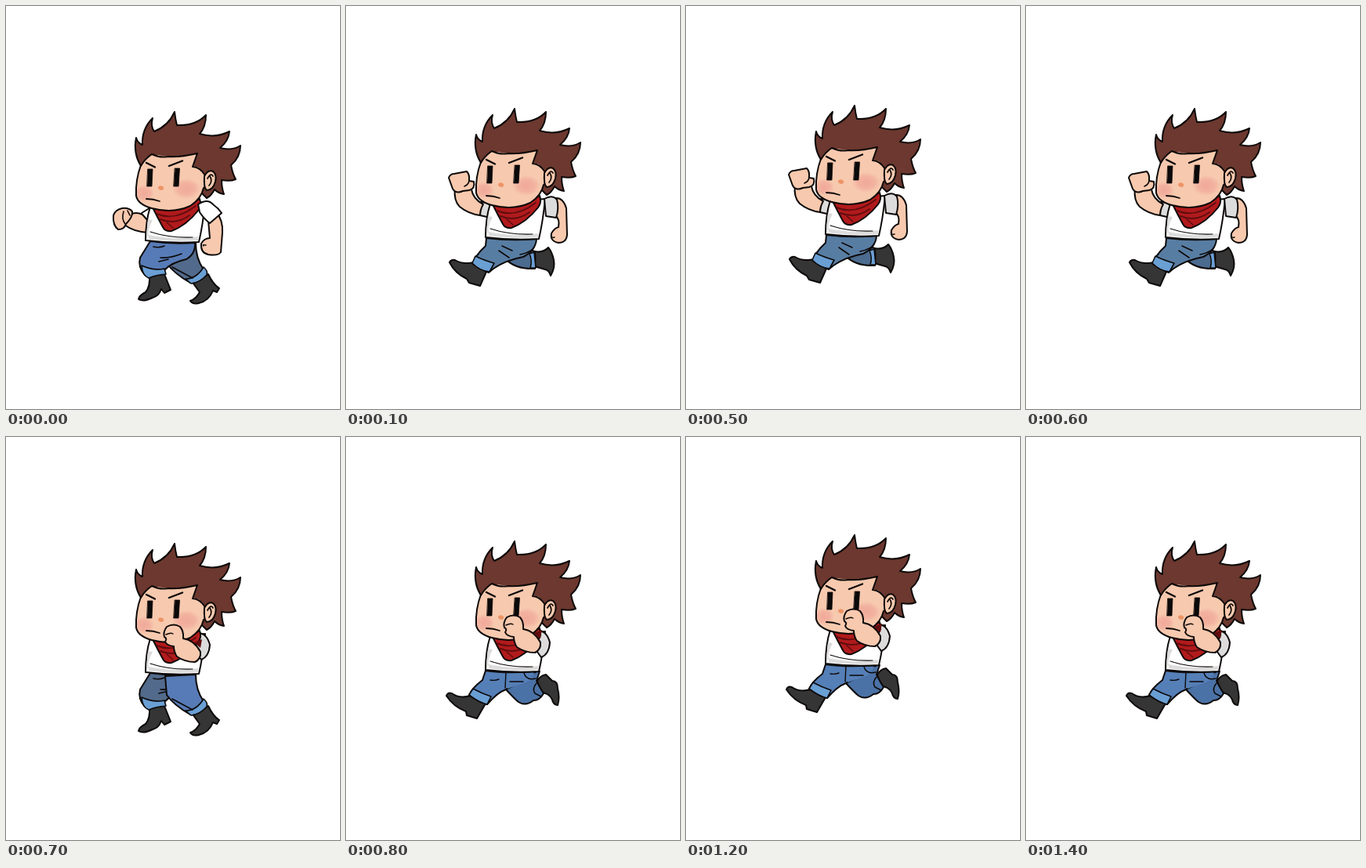
Write an HTML page with a canvas that moves like this. It is 426 by 514 pixels and loops after 1.5 s.

```html
<!DOCTYPE html>
<html lang="en">
<head>
<meta charset="utf-8">
<title>Runner</title>
<style>
html, body { margin: 0; height: 100%; overflow: hidden; background: #fff; }
canvas { display: block; width: 426px; height: 514px; }
</style>
</head>
<body>
<canvas></canvas>
<script>
const canvas = document.querySelector('canvas');
const ctx = canvas.getContext('2d');
const ratio = devicePixelRatio || 1;
canvas.width = 426 * ratio;
canvas.height = 514 * ratio;

const INK = '#0d0908', SKIN = '#f7c9ae', HAIR = '#6c382f', RED = '#b11a1c', DARK_RED = '#5f0d0f';
const SHADE = '#dcdcdc', BOOT = '#343534', CUFF = '#6a9fd4';

function shape(fill, d, width = 2) {
  const path = new Path2D(d);
  ctx.fillStyle = fill;
  ctx.fill(path);
  if (width) stroke(path, width);
}
function line(d, width = 1.6, color) { stroke(new Path2D(d), width, color); }
function stroke(path, width, color = INK) {
  ctx.lineWidth = width;
  ctx.strokeStyle = color;
  ctx.stroke(path);
}
function shifted(y, draw) {
  ctx.save();
  ctx.translate(0, y);
  draw();
  ctx.restore();
}
function blush(x, y, rx, ry) {
  ctx.save();
  ctx.translate(x, y);
  ctx.scale(rx, ry);
  const glow = ctx.createRadialGradient(0, 0, 0, 0, 0, 1);
  glow.addColorStop(0, '#ec908a90');
  glow.addColorStop(.6, '#ec908a66');
  glow.addColorStop(1, '#ec908a00');
  ctx.fillStyle = glow;
  ctx.fillRect(-1, -1, 2, 2);
  ctx.restore();
}

function head() {
  shape(HAIR, 'M172 194Q162 178 166 158Q168 165 174 167Q173 147 187 133Q184 143 189 150Q207 143 215 125Q216 134 218 142Q242 143 255 129Q255 144 247 153Q267 159 285 150Q284 162 273 171Q288 175 299 168Q299 183 287 193Q289 204 293 211Q286 214 275 212Q275 222 278 230Q271 229 266 224Q262 232 256 235L246 225L200 200Z');
  shape(SKIN, 'M172 193Q165 212 166 232Q168 243 186 248Q213 255 235 245Q249 236 252 222L255 206L246 196L239 194L243 178Q223 184 207 182Q196 180 186 180Q180 184 172 193Z', 0);
  blush(176, 229, 13, 11);
  blush(230, 223, 18, 13);
  line('M172 193Q165 212 166 232Q168 243 186 248Q213 255 235 245Q249 236 252 222', 2);
  line('M172 194Q178 184 186 179Q196 184 207 182Q223 183 244 178L238 195Q247 195 254 206', 2);
  shape(SKIN, 'M253 207Q258 198 264 201Q269 205 267 214Q264 225 256 225Q252 222 253 207Z');
  line('M257 210Q261 202 264 207M260 207Q264 213 259 219', 1.7);
  line('M179 190L190 195.5M208 194L225 187.5', 2.4);
  shape('#0b0909', 'M181 198H187L186 220H180Z M215.5 197H221.5L220 220H214Z', .8);
  shape('#ec9566', 'M194 221Q196 218 200 220Q203 223 199 225Q194 225 194 221Z', 0);
  line('M179 236Q188 236 196 239', 1.8);
}

function torso() {
  shape('#fff', 'M184 246Q178 265 178 289Q211 293 246 291Q251 270 254 240Z');
  shape(SHADE, 'M181 262L187 263Q180 276 182 283L179 285Z M182 282Q215 289 245 284L245 289Q210 291 182 287Z', 0);
  line('M184 278Q208 286 238 285', 1.1);
}
function scarf() {
  shape(RED, 'M187 247Q216 255 247 236Q250 244 245 251Q230 270 211 277Q203 278 200 272Q194 261 187 247Z');
  line('M192 255Q216 265 242 245M197 262Q216 270 234 257', 1.9, DARK_RED);
  line('M205 266L213 273', 1.6, DARK_RED);
}

// Full stride with the far arm swung forward.
function strideFarArm() {
  shape(SHADE, 'M172 244L187 246L184 264L171 261Z');
  shape(SKIN, 'M139 226Q137 242 145 250Q156 259 171 261Q171 254 175 247Q162 240 160 228Z');
  shape(SKIN, 'M131 213Q133 208 138 208L154 205Q158 209 157 217L163 218Q165 227 157 229L149 230Q140 234 136 227Z');
  line('M157 217Q156 222 151 224');
}
function strideNearArm() {
  shape(SKIN, 'M267 239Q277 238 281 252L282 286Q281 296 271 296Q260 294 262 284Q266 277 271 276Q273 266 267 261Z');
  line('M262 288Q263 290 266 289', 1.4);
  shape(SHADE, 'M253 240Q263 234 269 241Q272 252 268 264L255 262Z');
}
function strideLegs() {
  shape(BOOT, 'M240 307Q252 309 258 302Q263 308 265 318Q267 328 261 338Q259 331 254 330L240 326Z');
  shape('#4b6b8f', 'M204 317Q216 330 241 329Q242 318 241 307L218 300Z');
  shape(CUFF, 'M234 310L240 308L242 328L235 328Q238 319 234 310Z', 1.5);
  shape(BOOT, 'M132 321Q134 317 139 318Q149 324 163 321L179 333L171 351L157 347L154 342Q139 335 132 321Z');
  shape('#587da3', 'M179 290Q212 294 243 291Q242 306 226 314Q204 318 188 329L182 334L162 323Q164 313 178 300Z');
  shape(CUFF, 'M165 313Q175 318 189 322L183 333Q171 332 161 322Z', 1.6);
  line('M199 300L212 306M195 306L208 315M222 311Q237 308 240 301');
}

// Full stride with the near arm swung forward.
function crossSleeve() {
  shape(SHADE, 'M245 239Q256 239 260 254Q259 269 249 273L241 262Z');
}
function crossArm() {
  shape(DARK_RED, 'M240 242L250 238L248 249Z', 0);
  shape(SKIN, 'M205 222Q214 217 222 222Q227 228 226 237Q240 239 248 254Q249 263 241 267Q228 267 218 260Q214 254 214 247Q205 246 203 241Q206 237 202 235Q200 229 205 222Z');
  line('M204 232Q210 229 213 231', 1.4);
}
function crossLegs() {
  shape(BOOT, 'M244 303Q248 296 255 295L263 303Q270 303 270 313Q273 324 270 334Q264 333 263 327Q259 318 248 318Z');
  shape('#4b72a6', 'M202 294L247 291L243 303Q248 313 252 319Q247 328 239 328Q229 336 220 330Q215 326 204 314Z');
  line('M243 306Q237 313 241 319L249 323');
  shape(BOOT, 'M128 322Q130 317 135 319Q145 326 158 322L178 332L167 351L154 347L153 342Q137 336 128 322Z');
  shape('#557fb7', 'M178 290Q205 294 243 291Q229 302 204 314Q193 318 180 333L157 321Q160 313 174 302Z');
  shape(CUFF, 'M162 313Q173 319 185 323L180 333Q170 331 157 321Z', 1.6);
  shape('#557fb7', 'M205 294L241 293L232 304L206 313Z', 0);
  line('M204 292L203 312M184 302Q190 303 195 301M209 304H226M227 293Q230 303 242 300', 1.4);
}

// Passing pose, legs under the body.
function passFarArm() {
  shape('#fff', 'M173 254L186 246L182 272L172 262Z');
  shape(SKIN, 'M158 256Q166 252 174 256L182 265L181 279Q163 278 151 269Z');
  shape(SKIN, 'M137 257Q139 250 148 248Q157 247 161 252Q162 259 153 268Q151 275 143 275Q136 270 137 257Z');
  line('M150 252Q147 262 152 268M155 251L158 257');
}
function passNearArm() {
  shape(SKIN, 'M268 253Q277 263 276 279L274 304Q270 309 258 307Q248 305 249 293Q253 286 260 286L258 264Z');
  line('M252 296Q250 294 255 295', 1.4);
  shape('#fff', 'M245 243Q257 235 264 243Q271 248 275 254L260 267Q253 262 247 253Z');
}
function passBackLeg(color) {
  shape(BOOT, 'M239 344L247 355Q242 364 235 366Q238 371 246 369Q259 366 264 353L269 355L272 350Q264 345 258 332Z');
  shape(color, 'M203 294L242 292Q242 312 252 326L235 343Q214 331 205 318Z');
  shape(CUFF, 'M229 338Q243 338 252 323Q258 328 256 333Q247 343 236 344Z', 1.6);
  line('M212 323L238 337');
}
function passFrontLeg(color) {
  shape(BOOT, 'M183 334Q184 348 178 355Q170 359 169 364Q175 368 187 362Q195 360 198 351L202 356L210 352L202 332Z');
  shape(color, 'M184 290Q212 294 241 292Q242 306 230 313Q211 317 202 327L177 333Q168 323 171 311Z');
  shape(CUFF, 'M173 321Q188 328 202 325L204 332Q191 333 182 337Q174 334 173 321Z', 1.6);
  line('M188 297Q195 299 202 296M197 311Q209 312 224 306M195 316L207 313');
}

const poses = {
  passFar() {
    passFarArm();
    passBackLeg('#526a8b');
    passFrontLeg('#577bb6');
    torso(); scarf(); passNearArm(); head();
  },
  strideFar() {
    strideFarArm(); strideLegs(); torso(); scarf(); strideNearArm(); head();
  },
  passNear() {
    passFrontLeg('#526a8b');
    passBackLeg('#577bb6');
    torso(); crossSleeve(); scarf(); head();
    shifted(9, crossArm);
  },
  strideNear() {
    crossLegs(); torso(); crossSleeve(); scarf(); head(); crossArm();
  }
};

// Each stride is a leap whose height follows a parabola.
function poseAt(step) {
  if (step === 0) return ['passFar', 10];
  if (step < 7) return ['strideFar', (step - 3.5) ** 2 - .25];
  if (step === 7) return ['passNear', 11];
  return ['strideNear', (step - 11) ** 2 - 1];
}

const start = performance.now();
function frame() {
  const step = Math.floor((performance.now() - start) % 1500 / 100);
  const [pose, drop] = poseAt(step);
  ctx.setTransform(ratio, 0, 0, ratio, 0, 0);
  ctx.fillStyle = '#fff';
  ctx.fillRect(0, 0, 426, 514);
  ctx.lineCap = ctx.lineJoin = 'round';
  shifted(drop, poses[pose]);
  requestAnimationFrame(frame);
}
frame();
</script>
</body>
</html>
```
